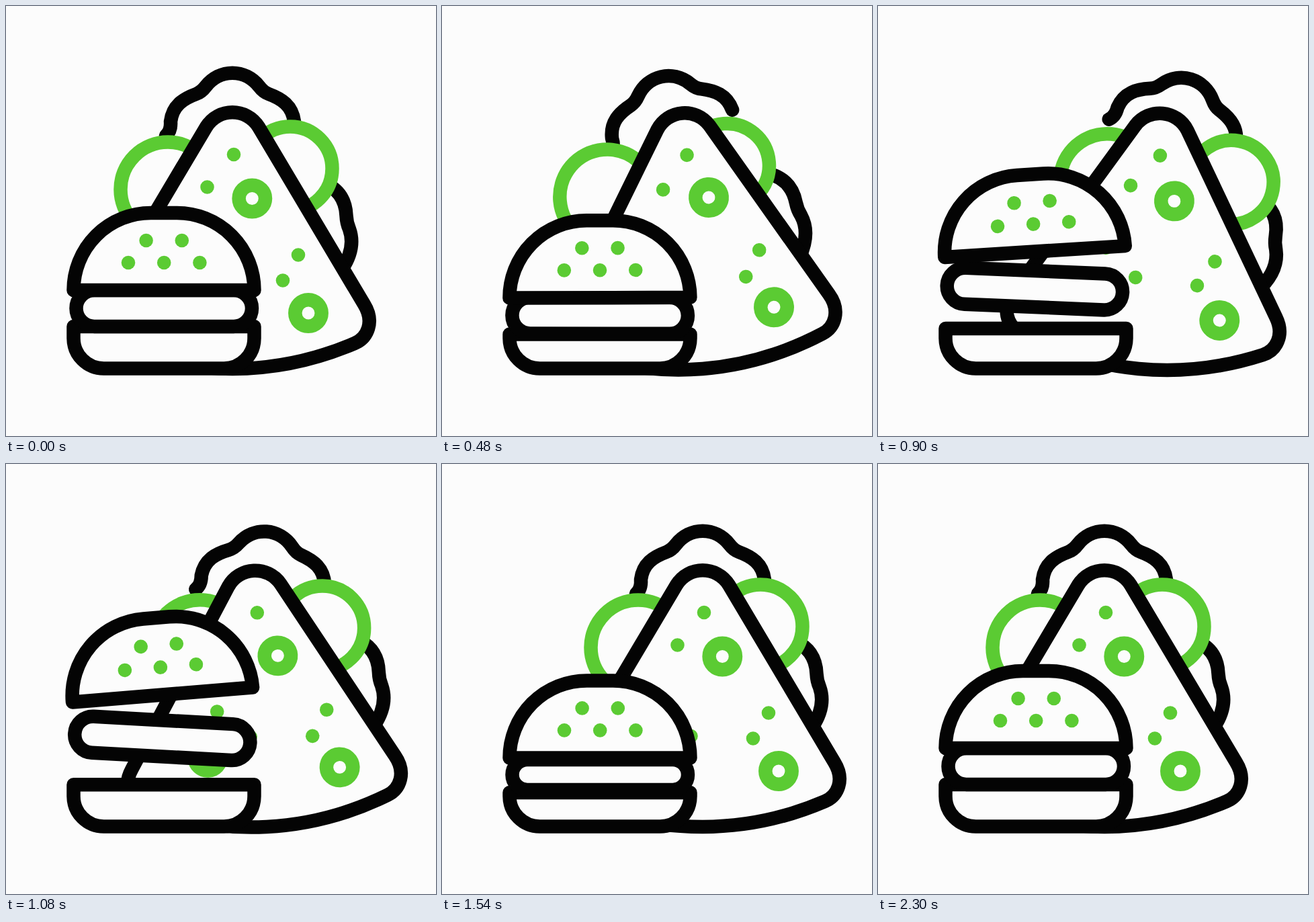
Recreate the animation shown at these times as an HTML page. Size 640 by 640 pixels, loop 2400 ms.

```html
<!DOCTYPE html>
<html lang="en">
<head>
<meta charset="utf-8">
<title>Burger and sandwich</title>
<style>
  html, body { margin: 0; height: 100%; overflow: hidden; background: #fcfcfc; }
  svg { display: block; width: 100vw; height: 100vh; }
  .line { fill: #fcfcfc; stroke: #040404; stroke-width: 20.5; stroke-linejoin: round; stroke-linecap: round; }
  .open { fill: none; }
  .ring { fill: #fcfcfc; stroke: #5bcb33; stroke-width: 20.5; }
  .dot { fill: #5bcb33; }
</style>
</head>
<body>
<svg viewBox="0 0 640 640">
  <g id="sandwich">
    <path id="leafSide" class="line open" d="M470 262Q505 275 506.500 312Q507 323 511 332Q521 360 500 392"/>
    <path id="leafTop" class="line open" d="M238 193Q246 186 245 172C248 148 264 138 283 131Q291 128 297 120C318 93 356 93 377 120Q383 128 391 131C410 138 426 148 429 172"/>
    <g id="tomatoes">
      <circle class="ring" cx="241" cy="273" r="70.500"/>
      <circle class="ring" cx="423" cy="242" r="62.500"/>
    </g>
    <path class="line" d="M298 180C316 151 358 151 376 180L533 444C549 470 538 494 519 502C463 526 400 540 337 540S211 526 155 502C136 494 125 470 141 444Z"/>
    <g id="filling">
      <circle class="dot" cx="339" cy="221" r="10.300"/>
      <circle class="dot" cx="299.500" cy="269.500" r="10.300"/>
      <circle class="dot" cx="435" cy="370.500" r="10.300"/>
      <circle class="dot" cx="412" cy="408.500" r="10.300"/>
      <circle class="dot" cx="272" cy="365" r="10.300"/>
      <circle class="dot" cx="319.500" cy="405" r="10.300"/>
      <circle class="ring" cx="366.300" cy="286.500" r="19.700"/>
      <circle class="ring" cx="450" cy="457" r="19.700"/>
      <circle class="ring" cx="254.500" cy="432.500" r="19.700"/>
    </g>
  </g>
  <g id="crumbs"></g>
  <path id="base" class="line"/>
  <rect id="patty" class="line" x="104.500" width="261.500"/>
  <g id="bun">
    <path class="line" d="M100.500 423A115 115 0 0 1 215.500 308H254.500A115 115 0 0 1 369.500 423Z"/>
    <g id="seeds"></g>
  </g>
</svg>
<script>
const LOOP = 2400, RETURN = 1540, REST = 2300;
const el = id => document.getElementById(id);

function set(node, attrs) {
  for (const name in attrs) node.setAttribute(name, attrs[name]);
  return node;
}

function addDot(parent, cx, cy) {
  const dot = document.createElementNS("http://www.w3.org/2000/svg", "circle");
  return el(parent).appendChild(set(dot, { cx, cy, r: 10.3, class: "dot" }));
}

for (let i = 0; i < 5; i++) addDot("seeds", 182 + 26.6 * i, i % 2 ? 349 : 382);
const crumbs = [0, 1, 2].map(() => addDot("crumbs", 0, 0));

// Smooth step from 0 to 1 between two times
function ramp(t, from, to) {
  const u = Math.min(1, Math.max(0, (t - from) / (to - from)));
  return (1 - Math.cos(Math.PI * u)) / 2;
}

// Wave that fades in and out; it first crosses zero at `cross`, `bend` changes its tempo
function wave(t, span, cross, bend) {
  if (t <= 0 || t >= span) return 0;
  const fade = 1 - (2 * t / span - 1) ** 4;
  return fade * Math.sin(Math.PI * (t / cross) ** bend);
}

// Lag behind the slide to the right, then behind the slide back
const lag = (t, out, back, cross, bend) =>
  back * wave(t - RETURN, REST - RETURN, cross, bend) - out * wave(t, RETURN, cross, bend);

const place = (id, x, y, turn, cx, cy) =>
  set(el(id), { transform: `translate(${x} ${y}) rotate(${turn} ${cx} ${cy})` });

function drawSandwich(t) {
  const slide = 51 * (ramp(t, 0, 440) - ramp(t, RETURN, 2000));
  const leaf = lag(t, 12, 10, 635, 1.1);
  place("sandwich", slide, 0, lag(t, 6.6, 4.5, 600, 1.3), 337, 540);
  place("leafTop", 0, 0, leaf, 337, 280);
  place("leafSide", 0, 0, leaf / 2, 400, 460);
  place("tomatoes", lag(t, 26, 27, 730, 1.58), 0, lag(t, 4.8, 12, 500, 0.7), 320, 257);
}

function drawBurger(t) {
  const lift = ramp(t, 390, 1160) - ramp(t, 1160, 1530);
  const recover = ramp(t, 1530, 1760);
  const squash = ramp(t, 0, 390) - lift - recover;
  const half = 27 - 4.5 * (ramp(t, 1380, 1530) - recover);

  set(el("base"), {
    d: `M100.5 ${477 + 12 * squash}H369.5V494.5A45 45 0 0 1 324.5 539.5H145.5A45 45 0 0 1 100.5 494.5Z`
  });
  set(el("patty"), { y: 450 - half, height: 2 * half, rx: half });
  place("patty", -2.5 * lift, 12.5 * squash - 43 * lift, 3.2 * lift, 235, 450);
  place("bun", -2 * lift, 14.5 * squash - 82 * lift, -4.8 * lift, 235, 423);
}

// Crumbs burst in a fan from behind the bun and fall back
function drawCrumbs(t) {
  const flight = Math.min(1, Math.max(0, (t - 1620) / 680));
  const reach = 90 * Math.sin(Math.PI * flight);
  crumbs.forEach((dot, i) => {
    const angle = -(92 + 36 * i) * Math.PI / 180;
    set(dot, { cx: 163 + reach * Math.cos(angle), cy: 354 + reach * Math.sin(angle) });
  });
  set(el("crumbs"), { visibility: flight % 1 ? "visible" : "hidden" });
}

const start = performance.now();
function tick() {
  const t = (performance.now() - start) % LOOP;
  drawSandwich(t);
  drawBurger(t);
  drawCrumbs(t);
  requestAnimationFrame(tick);
}
tick();
</script>
</body>
</html>
```
